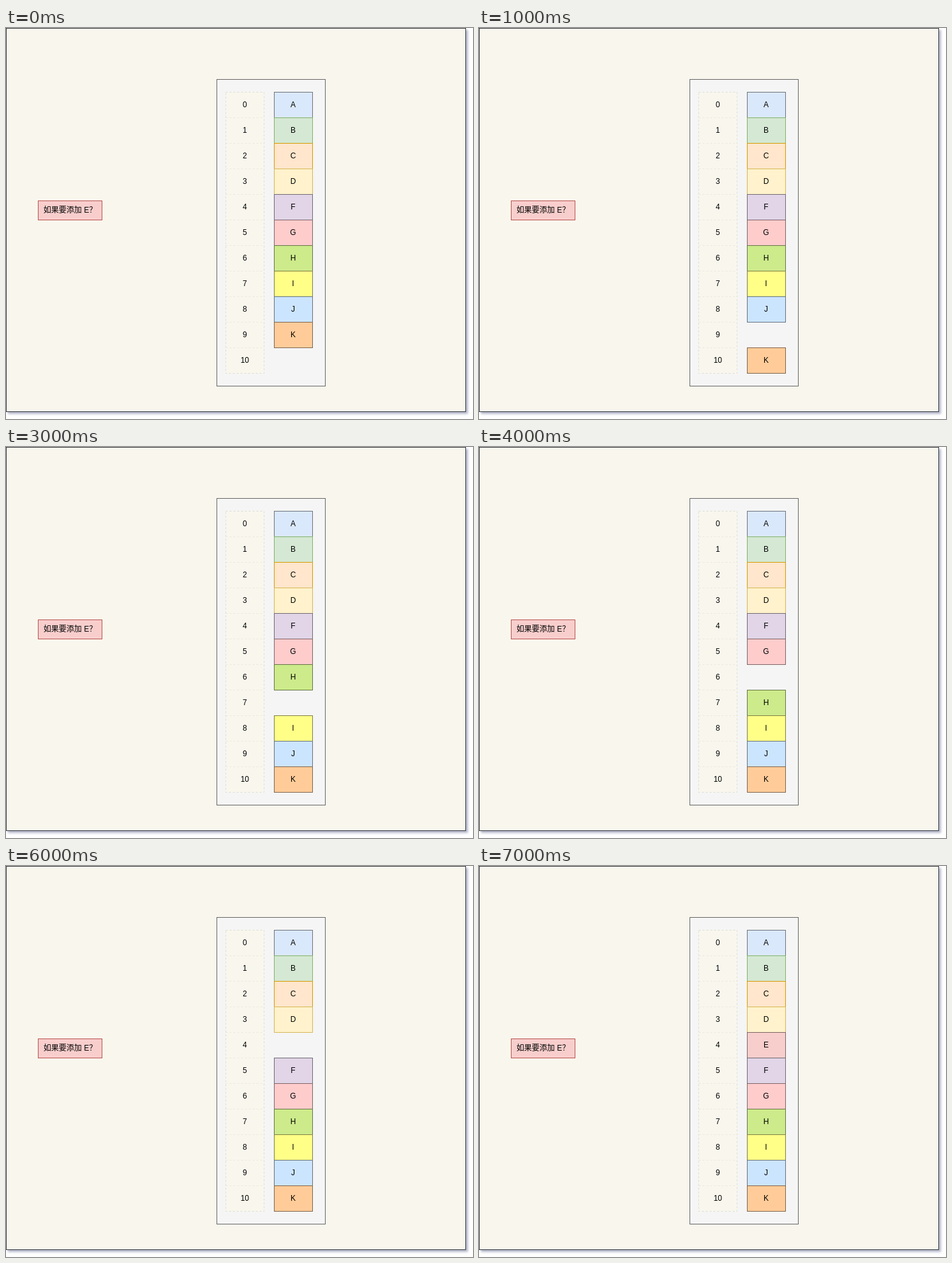
An HTML page with a canvas that plays this animation: 732x612 px, repeating every 8000 ms.

```html
<!DOCTYPE html>
<html lang="zh-CN">
<head>
<meta charset="utf-8">
<title>数组插入</title>
<style>
  html, body { margin: 0; width: 100%; height: 100%; overflow: hidden; background: #fff; }
  canvas { display: block; }
</style>
</head>
<body>
<canvas id="stage" width="732" height="612"></canvas>
<script>
const ctx = document.getElementById('stage').getContext('2d');
const STEP = 1000, LOOP = 8000;
const ROW = 40, TOP = 100, SLOTS = 11;
const INSERT_AT = 4;
const PAPER = '#f9f7ed', EDGE = 'rgba(0,0,0,0.5)';

const items = [
  ['A', '#dae8fc'],
  ['B', '#d5e8d4', '#82b366'],
  ['C', '#ffe6cc', '#d79b00'],
  ['D', '#fff2cc', '#d6b656'],
  ['F', '#e1d5e7'],
  ['G', '#ffcccc'],
  ['H', '#cdeb8b'],
  ['I', '#ffff88'],
  ['J', '#cce5ff'],
  ['K', '#ffcc99']
];
const added = ['E', '#f8cecc'];

function box(x, y, w, h, fill, stroke) {
  ctx.fillStyle = fill;
  ctx.fillRect(x, y, w + 1, h + 1);
  ctx.strokeStyle = stroke;
  ctx.strokeRect(x + 0.5, y + 0.5, w, h);
}

function label(text, x, baseline) {
  ctx.fillStyle = '#000';
  ctx.fillText(text, x, baseline);
}

function cell([name, fill, stroke = EDGE], slot) {
  const y = TOP + slot * ROW;
  box(420, y, 60, ROW, fill, stroke);
  label(name, 450, y + 24);
}

function background() {
  ctx.fillStyle = '#fff';
  ctx.fillRect(0, 0, 732, 612);
  ctx.save();
  ctx.shadowColor = 'rgba(61,69,116,0.4)';
  ctx.shadowBlur = 3.4;
  ctx.shadowOffsetX = ctx.shadowOffsetY = 3;
  ctx.fillStyle = PAPER;
  ctx.fillRect(0, 0, 721, 601);
  ctx.restore();
  box(0, 0, 720, 600, PAPER, '#36393d');
}

function indexColumn() {
  ctx.save();
  ctx.setLineDash([3, 3]);
  box(344, TOP, 60, ROW * SLOTS, PAPER, '#dcdcd6');
  ctx.strokeStyle = '#e9e8e0';
  for (let i = 0; i < SLOTS; i++) {
    const y = TOP + i * ROW;
    if (i) {
      ctx.beginPath();
      ctx.moveTo(344.5, y + 0.5);
      ctx.lineTo(404.5, y + 0.5);
      ctx.stroke();
    }
    label(String(i), 374.3, y + 24);
  }
  ctx.restore();
}

function draw(time) {
  const step = Math.floor((time % LOOP) / STEP);
  const gap = Math.max(INSERT_AT, items.length - step);

  ctx.lineWidth = 1;
  ctx.font = '12px "Liberation Sans", "Noto Sans CJK SC", "Noto Sans CJK", sans-serif';
  ctx.textAlign = 'center';
  background();
  box(50, 270, 100, 30, '#f8cecc', '#b85450');
  label('如果要添加 E？', 100.5, 289);
  box(330, 80, 170, 480, '#f5f5f5', '#666');
  indexColumn();

  const column = items.slice();
  column.splice(gap, 0, step === 7 ? added : null);
  column.forEach((item, slot) => item && cell(item, slot));
}

const start = performance.now();
function tick() {
  draw(performance.now() - start);
  requestAnimationFrame(tick);
}
tick();
</script>
</body>
</html>
```
